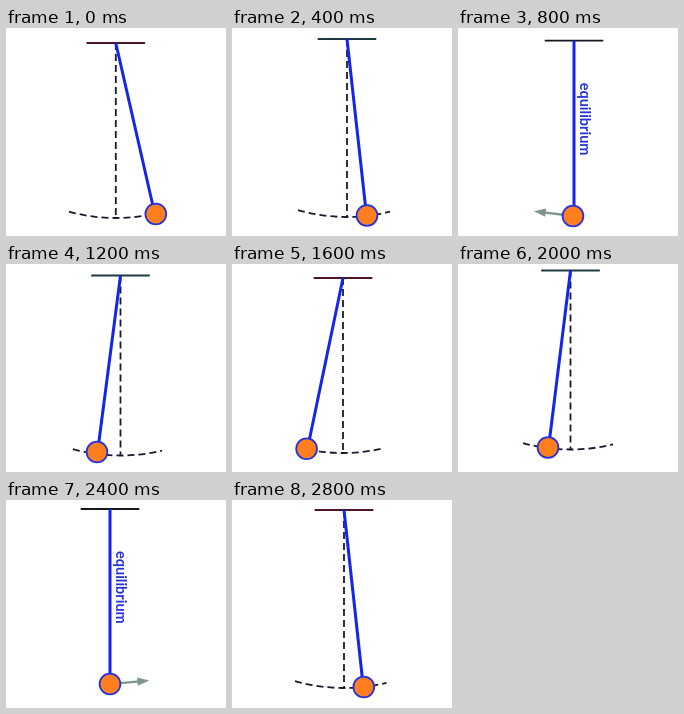
Write an HTML page that moves like this. It is 220 px wide and 208 px high and loops after 3200 ms.

```html
<!DOCTYPE html>
<html lang="en">
<head>
<meta charset="utf-8">
<title>Pendulum</title>
<style>
html, body { margin: 0; width: 100%; height: 100%; overflow: hidden; background: #fff; }
svg { display: block; width: 100vw; height: 100vh; }
text { font: 700 14.5px Lato, "Open Sans", sans-serif; fill: #2433d6; }
.dash { fill: none; stroke: #161c2b; stroke-width: 1.8; stroke-dasharray: 7 4; }
</style>
</head>
<body>
<svg viewBox="0 0 220 208">
  <line id="bar" stroke-width="1.8"/>
  <g id="guides">
    <path id="rest" class="dash"/>
    <path id="arc" class="dash"/>
  </g>
  <line id="rod" stroke="#1426ea" stroke-width="3"/>
  <text id="label">equilibrium</text>
  <g id="arrow" fill="#7d968b" stroke="#7d968b">
    <path d="M10 0H30" stroke-width="2.4"/>
    <path d="M39.5 0L27.5 -4.2V4.2Z" stroke="none"/>
  </g>
  <circle id="bob" r="10.4" fill="#ff7f1f" stroke="#2632dc" stroke-width="1.8"/>
</svg>
<script>
const STEP = 400;
const MAROON = '#4b1626', BLACK = '#17171f', TEAL = '#1c3a40';

// pivot, bob, arc radius and horizontal limits of the arc
const swing = (x, y, bx, by, r, left, right, color) =>
  ({ x, y, bx, by, r, left, right, color });
// vertical pose with the direction of motion
const middle = (x, y, bx, by, dir) => ({ x, y, bx, by, dir, color: BLACK });

const poses = [
  swing(109.8, 15, 149.8, 186, 175, 63, 142, MAROON),
  swing(115, 11, 135, 187.5, 178, 66, 158, TEAL),
  middle(116, 12.7, 115, 188, -1),
  swing(114.5, 11.5, 91, 188, 180, 67, 156, TEAL),
  swing(111, 14, 74.6, 184.7, 175, 76, 152, MAROON),
  swing(112.5, 6.5, 90, 183.5, 179, 65, 155, TEAL),
  middle(104, 9, 104, 184, 1),
  swing(112, 10, 131.8, 187, 178, 63, 154.5, MAROON)
];

const el = id => document.getElementById(id);
const set = (id, attrs) => {
  for (const k in attrs) el(id).setAttribute(k, attrs[k]);
};
const show = (id, on) => set(id, { visibility: on ? 'visible' : 'hidden' });

function draw(time) {
  const p = poses[Math.floor(time / STEP) % poses.length];
  const { x, y, bx, by, r, left, right, dir } = p;
  const arcY = px => y + Math.sqrt(r * r - (px - x) ** 2);

  set('bar', { x1: x - 29.3, x2: x + 29.3, y1: y, y2: y, stroke: p.color });
  // the rod meets the bob slightly on its inner side
  set('rod', { x1: x, y1: y, x2: dir ? x : bx + (x - bx) * 0.025, y2: by });
  set('bob', { cx: bx, cy: by });

  show('guides', !dir);
  show('label', dir);
  show('arrow', dir);
  if (dir) {
    set('label', { transform: `translate(${x + 5.7} ${y + 42}) rotate(90)` });
    set('arrow', { transform: `translate(${bx} ${by}) rotate(${dir > 0 ? -5 : 187})` });
  } else {
    set('rest', { d: `M${x} ${y}V${y + r}` });
    set('arc', { d: `M${left} ${arcY(left)}A${r} ${r} 0 0 0 ${right} ${arcY(right)}` });
  }
}

const start = performance.now();
function tick() {
  draw(performance.now() - start);
  requestAnimationFrame(tick);
}
tick();
</script>
</body>
</html>
```
